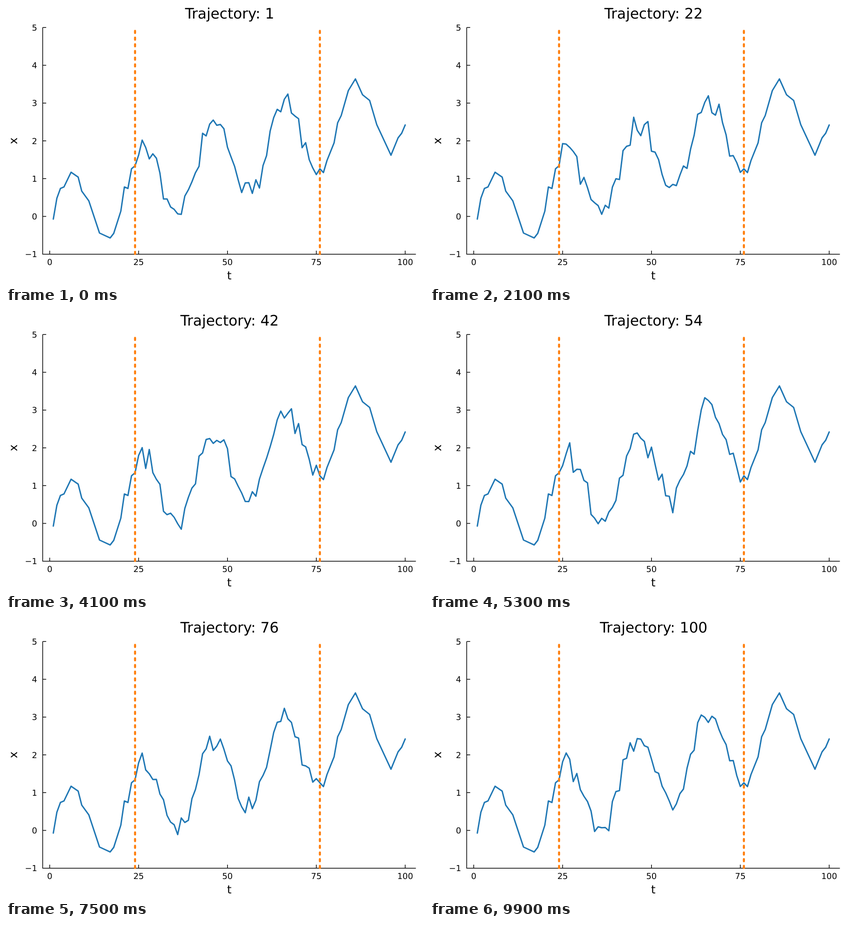
Write an HTML page that moves like this. It is 900x600 px and loops after 10 s.

```html
<!DOCTYPE html>
<html lang="en">
<head>
<meta charset="utf-8">
<title>Trajectories</title>
<style>
  html, body { margin: 0; width: 100%; height: 100%; overflow: hidden; background: #fff; }
  svg { display: block; width: 900px; height: 600px; }
  text { font-family: "DejaVu Sans", sans-serif; fill: #000; text-rendering: geometricPrecision; }
</style>
</head>
<body>
<svg id="stage" viewBox="0 0 900 600"></svg>
<script>
const STEP = 100, COUNT = 100;
const FIRST = 24, LAST = 76; // the path is resampled between these times

// Key points [t, x] of the two fixed ends, joined by straight lines
const start = [
  [1, -.07], [2, .48], [3, .74], [4, .78], [6, 1.17], [8, 1.04], [9, .67], [11, .41],
  [14, -.44], [17, -.57], [18, -.45], [20, .14], [21, .78], [22, .74], [23, 1.26], [FIRST, 1.34]];
const end = [
  [LAST, 1.26], [77, 1.16], [78, 1.48], [80, 1.95], [81, 2.48], [82, 2.67], [84, 3.33], [86, 3.64],
  [88, 3.22], [90, 3.07], [92, 2.43], [96, 1.62], [98, 2.08], [99, 2.2], [100, 2.42]];

const stage = document.getElementById("stage");
const px = t => 94.2 + 7.653 * t;
const py = x => 452.5 - 81.23 * x;

function add(name, attrs, text = "") {
  const node = document.createElementNS("http://www.w3.org/2000/svg", name);
  for (const key in attrs) node.setAttribute(key, attrs[key]);
  node.textContent = text;
  return stage.appendChild(node);
}

function label(text, x, y, size, anchor = "middle", extra = {}) {
  return add("text", { x, y, "font-size": size, "text-anchor": anchor, ...extra }, text);
}

function seeded(seed) {
  let s = Math.imul(seed, 0x9E3779B1);
  return () => {
    s = (s + 0x6D2B79F5) | 0;
    let v = Math.imul(s ^ (s >>> 15), 1 | s);
    v = (v + Math.imul(v ^ (v >>> 7), 61 | v)) ^ v;
    return ((v ^ (v >>> 14)) >>> 0) / 4294967296;
  };
}

// Rising sine wave with bell-shaped noise
function sampleMiddle(seed) {
  const random = seeded(seed);
  const points = [];
  for (let t = FIRST + 1; t < LAST; t++) {
    const noise = random() + random() + random() - 1.5;
    points.push([t, .03 * t + 1.02 * Math.sin(Math.PI * (t - 1.1) / 10) + .36 * noise]);
  }
  return points;
}

function pathFor(number) {
  return [...start, ...sampleMiddle(number), ...end]
    .map(([t, x]) => `${px(t).toFixed(2)},${py(x).toFixed(2)}`).join(" ");
}

let axes = "M79 46.3V533.7H882.5";
for (let x = -1; x <= 5; x++) {
  axes += `M79 ${py(x)}h7.5`;
  label(String(x).replace("-", "\u2212"), 67, py(x) + 6.5, 17.8, "end");
}
for (let t = 0; t <= 100; t += 25) {
  axes += `M${px(t)} 533.7v-7.5`;
  label(t, px(t), 557, 17.8);
}
add("path", { d: axes, fill: "none", stroke: "#000", "stroke-width": 1.5 });
label("t", 480.7, 588, 24.5);
label("x", 0, 0, 24.5, "middle", { transform: "translate(24 290) rotate(-90)" });

const title = label("", 481.5, 27, 31.2);
const curve = add("polyline", {
  fill: "none", stroke: "#1f77b4", "stroke-width": 3, "stroke-linejoin": "round", "stroke-linecap": "round"
});
for (const t of [FIRST, LAST]) {
  add("path", {
    d: `M${px(t)} 533.2V46.3`, stroke: "#ff7f0e", "stroke-width": 4.5,
    "stroke-linecap": "round", "stroke-dasharray": "4.5 9.9"
  });
}

let shown = 0;
function render(ms) {
  const number = Math.floor(ms / STEP) % COUNT + 1;
  if (number !== shown) {
    shown = number;
    title.textContent = `Trajectory: ${number}`;
    curve.setAttribute("points", pathFor(number));
  }
}

const origin = performance.now();
function tick() {
  render(performance.now() - origin);
  requestAnimationFrame(tick);
}
tick();
</script>
</body>
</html>
```
